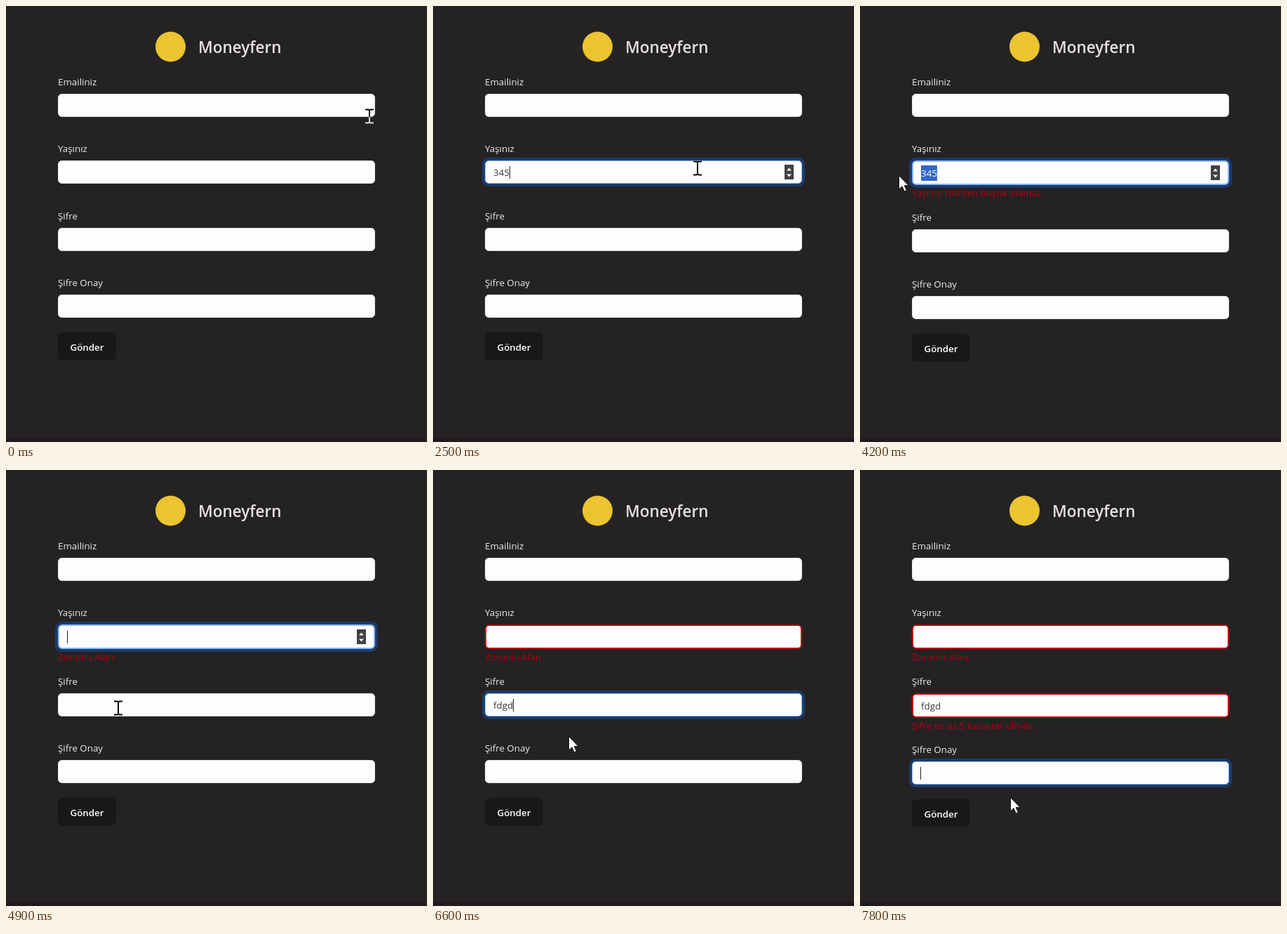
Animation of 600x621 px, one loop 8 s. Source, as an HTML page:

```html
<!DOCTYPE html>
<html lang="tr">
<head>
<meta charset="utf-8">
<title>Form</title>
<style>
html, body { margin: 0; width: 100%; height: 100%; overflow: hidden; background: #242223; }
svg { display: block; width: 600px; height: 621px; font: 13.35px "Open Sans", "Noto Sans", sans-serif; fill: #eceaea; }
text { white-space: pre; }
.title { font-size: 22.5px; font-weight: 600; fill: #e6e2df; }
.ring { fill: none; stroke: #0d6efd; stroke-opacity: .32; stroke-width: 4; }
.box { fill: #fefdfe; }
.value { fill: #34373b; }
.value .picked { fill: #fff; }
.pick { fill: #3167c6; }
.caret { fill: #222; }
.error { fill: #b8000f; }
.button { fill: #18171a; }
.send { font-weight: 600; fill: #fff; }
.beam { mix-blend-mode: difference; fill: none; stroke: #fff; stroke-width: 2; }
.arrow { fill: #fff; stroke: #111; stroke-width: 1; }
</style>
</head>
<body>
<svg id="stage" viewBox="0 0 600 621">
  <rect width="600" height="621" fill="#242223"/>
  <rect y="616" width="600" height="5" fill="#21191d"/>
  <circle cx="234.5" cy="58" r="21.5" fill="#ebc42f"/>
  <text class="title" x="274" y="67">Moneyfern</text>
  <g id="form"></g>
  <g id="submit">
    <rect class="button" x="74" y="465" width="82.5" height="39.5" rx="6"/>
    <text class="send" x="91.5" y="490.5">Gönder</text>
  </g>
  <g id="beam" class="beam"><path d="M-6-9.5H-1.5L0-8.5L1.5-9.5H6M0-9V9M-6 9.5H-1.5L0 8.5L1.5 9.5H6"/></g>
  <path id="arrow" class="arrow" d="M.5 .5V20L5 15.8L8.2 23L11.4 21.6L8.3 14.7H14.2Z"/>
</svg>
<script>
const LOOP = 8000, STEP = 100;
const AGE = 1, PASS = 2, CONFIRM = 3;

// Timelines: [time, value...], each entry holds until the next one.
const focusLog = [[0, -1], [1000, AGE], [3000, -1], [3900, AGE], [5200, PASS], [7100, -1], [7400, CONFIRM]];
const pickLog = [[0, 0], [4000, 1], [4100, 2], [4200, 3], [4800, 0]];
const pointer = [
  [0, 517.5, 156.5], [200, 515, 159], [500, 480, 185], [900, 394, 235], [1100, 382, 237.5],
  [2400, 382, 237.5], [2500, 377, 230.5], [2600, 377, 230.5], [2900, 347, 271], [3200, 345, 272],
  [3500, 300, 249], [3700, 142, 240], [3900, 122, 239], [4200, 55, 240.5], [4400, 51, 243],
  [4700, 88, 262], [4900, 160, 339], [5100, 175, 347], [5300, 178, 336], [6200, 178, 336],
  [6600, 193, 378.5], [7000, 193, 378.5], [7200, 203, 423], [7400, 203, 423], [7800, 214, 466]
];
const specs = [
  { label: "Emailiniz" },
  { label: "Yaşınız",
    typed: [[0, ""], [1900, "3"], [2200, "34"], [2500, "345"], [4800, ""]],
    errors: [[0, ""], [3000, "Yaşınız 100'den büyük olamaz."], [4800, "Zorunlu Alan."]] },
  { label: "Şifre",
    typed: [[0, ""], [6000, "f"], [6300, "fd"], [6500, "fdg"], [6600, "fdgd"]],
    errors: [[0, ""], [7100, "Şifre en az 5 karakter olmalı."]] },
  { label: "Şifre Onay" }
];

const $ = id => document.getElementById(id);
function add(parent, tag, attrs) {
  const el = document.createElementNS("http://www.w3.org/2000/svg", tag);
  set(el, attrs);
  parent.appendChild(el);
  return el;
}
function set(el, attrs) {
  for (const k in attrs) el.setAttribute(k, attrs[k]);
}
const show = (el, on) => el.style.display = on ? "" : "none";
const entry = (log, t) => log.filter(e => e[0] <= t).pop();
const clamp = v => Math.min(1, Math.max(0, v));

const fields = specs.map((spec, i) => {
  const g = add($("form"), "g", {});
  const f = { typed: [[0, ""]], errors: [[0, ""]], ...spec, i, g, top: Math.round(125 + 95.4 * i) };
  const make = (cls, tag = "rect") => add(g, tag, { class: cls });
  f.name = make("", "text");
  f.name.textContent = f.label;
  f.ring = make("ring");
  f.box = make("box");
  f.pick = make("pick");
  f.value = make("value", "text");
  f.head = add(f.value, "tspan", {});
  f.tail = add(f.value, "tspan", { class: "picked" });
  f.caret = make("caret");
  f.error = make("error", "text");
  if (i === AGE) {
    f.spin = make("", "g");
    add(f.spin, "rect", { width: 13, height: 21, fill: "#414141" });
    add(f.spin, "path", { d: "M3 8.5L6.5 4.5L10 8.5ZM3 13.5L6.5 17.5L10 13.5Z", fill: "#f4f4f4" });
  }
  return f;
});

function pointerAt(t) {
  const n = pointer.findIndex(p => p[0] > t);
  if (n < 0) return pointer[pointer.length - 1].slice(1);
  const a = pointer[n - 1], b = pointer[n], k = (t - a[0]) / (b[0] - a[0]);
  return [a[1] + (b[1] - a[1]) * k, a[2] + (b[2] - a[2]) * k];
}

// Focus glow eases in and out over 150 ms.
function glow(i, t) {
  const n = focusLog.indexOf(entry(focusLog, t));
  const k = clamp((t - focusLog[n][0] + 50) / 150);
  if (focusLog[n][1] === i) return k;
  return n && focusLog[n - 1][1] === i ? 1 - k : 0;
}

function drawField(f, t, shift, mx, my) {
  const [focusTime, focused] = entry(focusLog, t);
  const [typeTime, text] = entry(f.typed, t);
  const error = entry(f.errors, t)[1];
  const bad = error ? 1 : 0, line = 1 + bad;
  const y = f.top + shift, h = 33 + 2 * bad, x = 86 + bad, base = y + 22 + bad;
  const active = focused === f.i, level = glow(f.i, t);
  const hover = mx > 74 && mx < 526 && my > y && my < y + h;
  const picked = f.i === AGE ? entry(pickLog, t)[1] : 0;
  const cut = text.length - picked;

  set(f.name, { x: 74, y: y - 12.5 });
  set(f.ring, { x: 72, y: y - 2, width: 456, height: h + 4, rx: 7, opacity: level });
  set(f.box, {
    x: 74 + line / 2, y: y + line / 2, width: 452 - line, height: h - line, rx: 5,
    stroke: level > .5 ? "#86b7fe" : bad ? "#bd0010" : "#dee2e6", "stroke-width": line
  });
  set(f.value, { x, y: base });
  f.head.textContent = text.slice(0, cut);
  f.tail.textContent = text.slice(cut);
  const full = f.value.getComputedTextLength();
  const lead = cut > 0 ? f.value.getSubStringLength(0, cut) : 0;
  set(f.pick, { x: x + lead, y: y + 7, width: picked ? full - lead : 0, height: 22 });

  const since = t - Math.max(focusTime, typeTime);
  set(f.caret, { x: Math.round(x + full - .3), y: y + 8 + bad, width: 1, height: 18 });
  show(f.caret, active && !picked && since % 1000 < 500);
  f.error.textContent = error;
  set(f.error, { x: 74, y: y + 51 });
  if (f.spin) {
    set(f.spin, { transform: `translate(${501 - bad} ${y + 6 + bad})` });
    show(f.spin, active || hover);
  }
  return { hover, shift: shift + 2 * bad };
}

function render(t) {
  const [mx, my] = pointerAt(t);
  let shift = 0, over = false;
  for (const f of fields) {
    const r = drawField(f, t, shift, mx, my);
    shift = r.shift;
    over = over || r.hover;
  }
  set($("submit"), { transform: `translate(0 ${shift})` });
  for (const id of ["beam", "arrow"]) {
    set($(id), { transform: `translate(${Math.round(mx)} ${Math.round(my)})` });
    show($(id), over === (id === "beam"));
  }
}

const start = performance.now();
function tick() {
  const t = (performance.now() - start) % LOOP;
  render(Math.floor(t / STEP) * STEP);
  requestAnimationFrame(tick);
}
tick();
</script>
</body>
</html>
```
